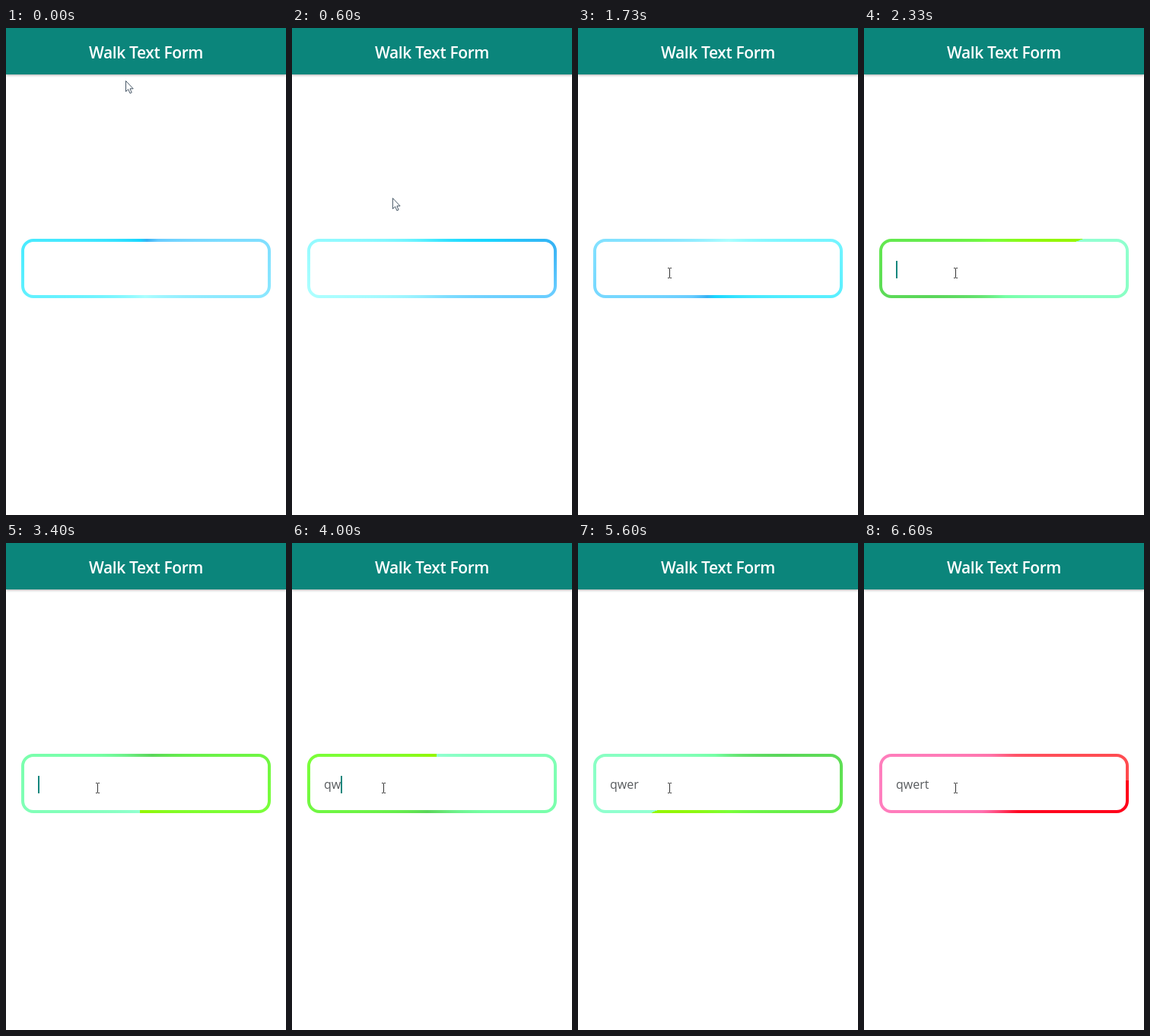
Animation of 368x640 px, one loop 6670 ms. Source, as an HTML page with a canvas:

```html
<!DOCTYPE html>
<html lang="en">
<head>
<meta charset="utf-8">
<title>Walk Text Form</title>
<style>
  html, body { margin: 0; width: 100%; height: 100%; overflow: hidden; background: #fff; }
  body { position: relative; font-family: "Open Sans", "Noto Sans", sans-serif; }
  header {
    position: absolute; left: 0; top: 0; width: 368px; height: 61px;
    background: #0b857b; box-shadow: 0 1px 3px rgba(0, 0, 0, .34);
    color: #fff; font-size: 21px; font-weight: 600; letter-spacing: -.38px;
    line-height: 64px; text-align: center;
  }
  canvas, #pointer { position: absolute; left: 0; top: 0; }
  #field {
    position: absolute; left: 42px; top: 305px; height: 24px;
    font-size: 16px; line-height: 25px; color: #585b5e; white-space: nowrap;
  }
  #caret {
    display: inline-block; width: 2px; height: 23px;
    vertical-align: top; margin-top: 1px; background: #12877d;
  }
</style>
</head>
<body>
<header>Walk Text Form</header>
<canvas id="border" width="368" height="640"></canvas>
<div id="field"><span id="text"></span><span id="caret"></span></div>
<svg id="pointer" width="368" height="640">
  <g id="arrow" fill="#fff" stroke="#345" stroke-width=".9">
    <path d="M.5 .5V14.5L3.7 11.6L6 16.8L8.2 15.8L6 10.8H10.2Z"/>
  </g>
  <g id="beam" fill="none" stroke="#333" stroke-width="1">
    <path d="M-2.5 -6.5H-.8L0 -6L.8 -6.5H2.5M0 -6V6M-2.5 6.5H-.8L0 6L.8 6.5H2.5"/>
  </g>
</svg>
<script>
const LOOP = 6670, STEP = 66.7;
const WORD = "qwert";
const FOCUS = 2070, KEYS = [3600, 3870, 4330, 4670, 5930];

// time, angle of the gradient seam in degrees
const SEAM = [[0, 92], [1270, 254], [2330, 339], [3400, 461.6],
              [4000, 639], [5600, 875.6], [6600, 1078.6]];
// time, x, y of the pointer
const PATH = [[0, 157, 69], [130, 155, 76], [400, 141, 160], [730, 126, 264],
              [870, 121.5, 304], [1000, 120.5, 322]];

// colours clockwise from the seam
const IDLE = [[0, "#acffff"], [.25, "#52eeff"], [.46, "#18d6ff"], [.5, "#36b2f4"],
              [.56, "#68ccff"], [.75, "#86e4ff"], [1, "#acffff"]];
const ACTIVE = [[0, "#92ffd2"], [.3, "#76ffa6"], [.42, "#66e472"], [.5, "#5ad65a"],
                [.62, "#66ee4c"], [.75, "#7aff3a"], [1, "#96f600"]];
const FULL = [[0, "#ff0018"], [.18, "#ff0a24"], [.36, "#ff70b0"], [.5, "#ff80c0"],
              [.68, "#ff74aa"], [.82, "#ff5468"], [1, "#ff4a4c"]];

const $ = id => document.getElementById(id);
const ctx = $("border").getContext("2d");

function sample(table, t, col) {
  let i = 1;
  while (i < table.length - 1 && table[i][0] < t) i++;
  const a = table[i - 1], b = table[i];
  const p = Math.min(1, (t - a[0]) / (b[0] - a[0]));
  return a[col] + (b[col] - a[col]) * p;
}

function drawBorder(stops, degrees) {
  const sweep = ctx.createConicGradient(degrees % 360 * Math.PI / 180, 184, 316);
  for (const [at, colour] of stops) sweep.addColorStop(at, colour);
  ctx.clearRect(0, 0, 368, 640);
  ctx.strokeStyle = sweep;
  ctx.lineWidth = 4;
  ctx.beginPath();
  ctx.roundRect(22, 279, 324, 74, 14);
  ctx.stroke();
}

function drawField(t) {
  const typed = KEYS.filter(k => k <= t);
  const last = typed.length ? typed[typed.length - 1] : FOCUS;
  const lit = t >= FOCUS && (t - last) % 1000 < 500;
  $("text").textContent = WORD.slice(0, typed.length);
  $("caret").style.visibility = lit ? "visible" : "hidden";
  return t < FOCUS ? IDLE : typed.length < WORD.length ? ACTIVE : FULL;
}

function drawPointer(t) {
  const x = sample(PATH, t, 1), y = sample(PATH, t, 2), inside = y > 277;
  $("arrow").style.display = inside ? "none" : "";
  $("beam").style.display = inside ? "" : "none";
  $(inside ? "beam" : "arrow").setAttribute("transform", `translate(${x} ${y})`);
}

const start = performance.now();
function frame() {
  const now = (performance.now() - start) % LOOP;
  const t = Math.min(99, Math.floor((now + 5) / STEP)) * STEP;
  drawBorder(drawField(t), sample(SEAM, t, 1));
  drawPointer(t);
  requestAnimationFrame(frame);
}
frame();
</script>
</body>
</html>
```
